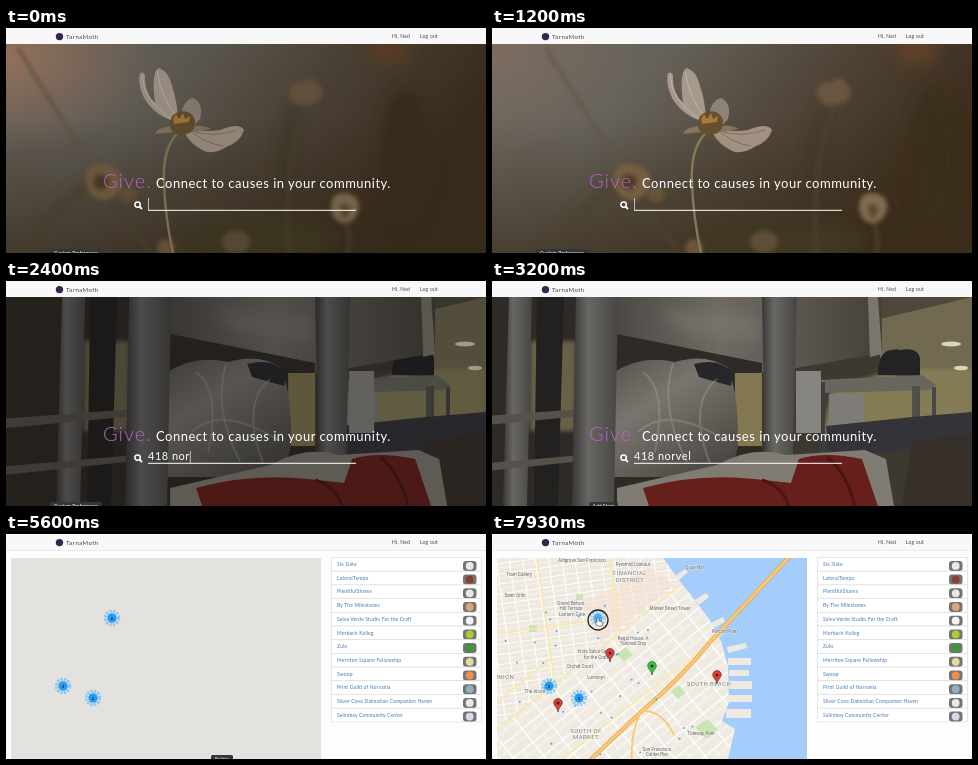
Write an HTML page that moves like this. It is 480 px wide and 225 px high and loops after 8 s.

```html
<!DOCTYPE html>
<html lang="en">
<head>
<meta charset="utf-8">
<title>Community search</title>
<style>
  html, body { margin: 0; width: 100%; height: 100%; overflow: hidden; background: #fdfdfe; }
  svg { display: block; width: 100vw; height: 100vh; }
  text { font-family: Lato, sans-serif; white-space: pre; }
  #labels text { font: 4.6px Roboto, sans-serif; fill: #5c5c5c; stroke: #fff; stroke-width: .8; stroke-opacity: .7; paint-order: stroke; text-anchor: middle; }
  #labels .area { font-size: 6px; letter-spacing: .4px; fill: #777; }
</style>
</head>
<body>
<svg viewBox="0 0 480 225">
  <defs>
    <filter id="soft" x="-50%" y="-50%" width="200%" height="200%"><feGaussianBlur stdDeviation="7"/></filter>
    <filter id="hazy" x="-50%" y="-50%" width="200%" height="200%"><feGaussianBlur stdDeviation="2"/></filter>
    <filter id="slight" x="-20%" y="-20%" width="140%" height="140%"><feGaussianBlur stdDeviation=".6"/></filter>
    <linearGradient id="meadow" x2="1" y2=".35">
      <stop stop-color="#6d675f"/><stop offset=".35" stop-color="#66625b"/>
      <stop offset=".65" stop-color="#51473a"/><stop offset="1" stop-color="#3c2d1c"/>
    </linearGradient>
    <linearGradient id="ground" x2="0" y2="1"><stop offset=".4" stop-color="#3a2d1b" stop-opacity="0"/><stop offset="1" stop-color="#3a2d1b" stop-opacity=".65"/></linearGradient>
    <radialGradient id="sun"><stop stop-color="#b98263" stop-opacity=".7"/><stop offset="1" stop-color="#a98468" stop-opacity="0"/></radialGradient>
    <linearGradient id="steel"><stop stop-color="#383735"/><stop offset=".35" stop-color="#696764"/><stop offset="1" stop-color="#484643"/></linearGradient>
    <linearGradient id="panel"><stop stop-color="#4b4844"/><stop offset=".4" stop-color="#6f6b64"/><stop offset="1" stop-color="#45413a"/></linearGradient>
    <linearGradient id="plastic" x2=".7" y2="1"><stop stop-color="#55524d"/><stop offset=".4" stop-color="#79756e"/><stop offset="1" stop-color="#4b4843"/></linearGradient>
    <pattern id="northGrid" width="13" height="10" patternUnits="userSpaceOnUse" patternTransform="rotate(-8)">
      <path fill="#eee9df" d="M0 0h13v10H0z"/><path d="M0 0H13M0 0V10" stroke="#fff" stroke-width="2.2"/><path d="M0 5H13" stroke="#faf8f4" stroke-width=".8"/>
    </pattern>
    <pattern id="southGrid" width="25" height="17" patternUnits="userSpaceOnUse" patternTransform="rotate(-39)">
      <path fill="#efebe2" d="M0 0h25v17H0z"/><path d="M0 0H25M0 0V17" stroke="#fff" stroke-width="2.6"/><path d="M0 8H25M13 0V8" stroke="#fbfaf6" stroke-width=".9"/>
    </pattern>
    <clipPath id="mapBox"><path d="M5 24H315V225H5z"/></clipPath>
    <clipPath id="heroBox"><path d="M0 16H480V225H0z"/></clipPath>
  </defs>

  <g id="hero" clip-path="url(#heroBox)">
    <path fill="#0c0c0c" d="M0 0H480V225H0z"/>
    <g id="flowers">
      <path fill="url(#meadow)" d="M0 0H480V225H0z"/>
      <path fill="url(#ground)" d="M0 0H480V225H0z"/>
      <ellipse id="glow" cx="5" cy="30" rx="150" ry="95" fill="url(#sun)"/>
      <g id="meadowDrift">
        <g filter="url(#soft)">
          <ellipse cx="382" cy="22" rx="22" ry="14" fill="#5e4128"/>
          <ellipse cx="250" cy="212" rx="80" ry="18" fill="#403824"/>
          <ellipse cx="400" cy="130" rx="26" ry="70" fill="#3a2d1c"/>
          <path d="M288 80Q270 150 280 235" stroke="#3d3424" stroke-width="8" fill="none"/>
          <path d="M20 225Q60 160 95 155" stroke="#4a402d" stroke-width="9" fill="none"/>
        </g>
        <g filter="url(#hazy)">
          <path d="M12 20Q60 100 92 145" stroke="#5e5445" stroke-width="2.5" fill="none"/>
          <path d="M282 66q3-16 15-11 7-9 16 1 10 14-8 20-16 6-23-10z" fill="#6a5540"/>
          <path d="M300 78Q276 130 283 230M338 190Q347 210 341 230M100 165Q130 200 148 230" stroke="#4b4230" stroke-width="3" fill="none"/>
          <path d="M80 152q-2-16 16-16 21 2 20 18-5 19-20 18-15-2-16-20z" fill="#755e40"/>
          <ellipse cx="122" cy="166" rx="9" ry="8" fill="#67523a"/>
          <path d="M325 180q0-16 14-15 15 2 14 16-4 14-15 14-11-1-13-15z" fill="#806d4f"/>
          <path d="M333 180q5-9 12 0-2 11-8 11z" fill="#5d4a31"/>
          <ellipse cx="230" cy="214" rx="14" ry="11" fill="#5f5039"/>
          <ellipse cx="160" cy="220" rx="9" ry="9" fill="#6d553a"/>
          <circle cx="95" cy="154" r="8" fill="#4e3d28"/>
        </g>
        <g filter="url(#slight)">
          <path d="M173 104Q156 119 158 155 159 190 168 230" stroke="#837958" stroke-width="2.4" fill="none"/>
          <path d="M174 93Q176 72 187 70 198 75 194 91L185 101z" fill="#8e8277"/>
          <path d="M168 93Q149 88 138 70 131 54 134 45q4-2 5 3-1 17 10 27-4-28 3-35 10 2 14 18 5 15 6 32z" fill="#a6988a"/>
          <path d="M136 47Q137 72 165 91M151 43q4 28 20 46" stroke="#d0c4b5" stroke-opacity=".65" fill="none"/>
          <path d="M181 99Q195 105 214 102q19-8 24 0-4 12-16 16-14 9-24 5-14-7-20-19z" fill="#a09182"/>
          <path d="M186 103q22 7 45-1M187 105q15 11 30 13" stroke="#7e7062" fill="none"/>
          <path d="M181 99q14-4 24 2l-22 4zM165 98q-14 1-16 8l20-2z" fill="#85755f"/>
          <path d="M164 99q-1-12 8-15 13-3 17 8 1 13-12 15-10 1-13-8z" fill="#65502e"/>
          <path d="M167 91l3-5 3 5 4-6 2 6 5-3-1 6-15 2z" fill="#a87a3c"/>
        </g>
      </g>
    </g>
    <g id="dorm">
      <path fill="#3d3830" d="M0 0H480V225H0z"/>
      <path fill="#716950" d="M375 16H480V130H400z"/>
      <path fill="#857b54" d="M405 88H480V155H330L340 108z" filter="url(#hazy)"/>
      <path fill="#4d483a" d="M388 38 480 16v-5H380z"/>
      <g fill="#d9d5c0" filter="url(#slight)"><ellipse cx="459" cy="63" rx="10" ry="2.5"/><ellipse cx="469" cy="87" rx="7" ry="2.3"/></g>
      <path fill="#232225" d="M386 94q0-19 9-24 10-3 13-1 18-3 20 8v18z"/>
      <path fill="#69665e" d="M325 99 430 94 444 104 437 109 332 112z"/>
      <path fill="#7f7c77" d="M337 113H372V147H337z"/>
      <path fill="url(#steel)" d="M325 101h8v75h-8zM420 105h8v120h-8zM440 106h4v92h-4z"/>
      <path fill="#34333a" d="M334 145 420 136 480 131V160L338 179z"/>
      <path fill="#37302a" d="M420 160 480 152V225H410z"/>
      <g id="bunks">
        <path fill="#2e2a25" d="M-80 16H270V225H-80z"/>
        <path fill="#686146" d="M38 60H84V150H38z" filter="url(#hazy)"/>
        <path fill="#827750" d="M243 92H270V165H243z"/>
        <path fill="#87857f" d="M304 90H329V152H304z" filter="url(#slight)"/>
        <path fill="#23211f" d="M45 16H72L66 225H42z"/>
        <path fill="url(#steel)" d="M17 16H40L35 225H11z"/>
        <path fill="#55514b" d="M-60 139 90 128v7L-60 149zM-60 187 90 174v6L-60 196z"/>
        <path fill="url(#panel)" d="M120 16H390V72L304 87 270 92 120 62z"/>
        <path fill="#2e2b27" d="M120 52 270 82V92L120 65z"/>
        <path fill="#807b72" opacity=".5" d="M166 29 267 35V61L190 51z" filter="url(#soft)"/>
        <path fill="#7c776d" d="M376 16H386L390 73 378 76z"/>
        <path fill="url(#steel)" d="M270 16H305L301 176H273z"/>
        <path fill="url(#plastic)" d="M120 196V92Q150 73 183 81 213 72 235 86 247 110 246 165L238 196z"/>
        <path fill="#27272b" d="M202 83Q230 76 241 94L239 105 207 96z"/>
        <path d="M151 91q25 18 12 80M181 83q-14 43 14 98M225 98q-30 25-7 84M146 151q30-28 89 9" stroke="#aaa69c" stroke-opacity=".35" stroke-width="2" fill="none" filter="url(#slight)"/>
        <path fill="#817c73" d="M225 184Q260 164 294 174L373 169 394 178 402 225H125V207z"/>
        <path fill="#671f1b" d="M151 207Q205 192 263 198L299 202 307 178Q332 170 370 178L386 225H157z"/>
        <path d="M270 199q20 6 27 26M335 176q20 16 28 49" stroke="#4a1614" stroke-width="3" fill="none" filter="url(#slight)"/>
        <path fill="url(#steel)" d="M84 16H126L122 225H80z"/>
      </g>
    </g>
    <path id="shade" fill="#0c0c0c" d="M0 0H480V225H0z"/>
    <text x="97" y="160" font-size="20" font-weight="300" letter-spacing="1" fill="#b862cc">Give.</text>
    <text x="150" y="159.5" font-size="13" letter-spacing=".5" fill="#fff">Connect to causes in your community.</text>
    <g fill="none" stroke="#fff"><circle cx="131.6" cy="176.6" r="2.7" stroke-width="1.5"/><path d="M133.6 178.6 136 181" stroke-width="1.8"/><path d="M142 182.3H350" stroke-width="1"/></g>
    <text id="query" x="142" y="179" font-size="11" letter-spacing=".5" fill="#fff"></text>
    <path id="caret" d="M0 170V182" stroke="#ddd" stroke-width=".8"/>
  </g>

  <g id="results">
    <path fill="#fdfdfe" d="M0 0H480V225H0z"/>
    <path d="M0 16.4H480" stroke="#e2e2e2" stroke-width=".8"/>
    <g id="list"></g>
    <g clip-path="url(#mapBox)">
      <path id="blankMap" fill="#e3e2de" d="M5 24H315V225H5z"/>
      <g id="map">
        <path fill="#a4cdfc" d="M5 24H315V225H5z"/>
        <path fill="url(#southGrid)" d="M5 24H171L184 43 199 61 217 85 229 107 236 132 237 168 230 187 243 195 236 225H5z"/>
        <path fill="url(#northGrid)" d="M5 24H171L190 50 5 195z"/>
        <path fill="#f5dfcf" fill-opacity=".55" d="M90 70 158 34 183 50 108 110z"/>
        <g fill="#cbe4b5"><path d="M125 120l9-7 7 8-9 7zM179 157l8-6 7 8-8 6zM37 91h8v7h-8zM84 60h7v6h-7zM203 193l13-8 10 11-12 9z"/></g>
        <g fill="#eeeae2"><path d="M235 113l19-4 1 5-19 5zM236 124h23v7h-23zM237 136h20v6h-20zM237 147h23v8h-23zM236 161h24v7h-24zM234 175h25v9h-25zM183 42l10-7 3 3-9 8zM203 66l11-7 3 4-10 8zM219 89l12-6 2 5-11 6z"/></g>
        <path d="M5 195 190 50M5 168 60 124M70 225 230 100M5 100 120 84M45 24 62 145M118 24 127 98" stroke="#fbe6a5" stroke-width="1.5" fill="none"/>
        <path d="M300 20 218 108Q190 143 150 177L94 230" stroke="#e8a54a" stroke-width="4.2" fill="none"/>
        <path d="M300 20 218 108Q190 143 150 177L94 230" stroke="#fbc773" stroke-width="2.8" fill="none"/>
        <path d="M150 177Q170 176 182 201M150 177Q138 196 140 230" stroke="#fbc773" stroke-width="1.8" fill="none"/>
        <g id="stops" fill="#5fa3e5"></g>
        <g id="labels"></g>
        <g id="pins"></g>
      </g>
      <g id="clusters"></g>
      <circle id="ring" cx="106" cy="86" r="10" fill="#fff" fill-opacity=".2" stroke="#222" stroke-width="1.3"/>
      <path id="hand" d="M-1 0q1.2-1.3 2 0v3l3 .7q1 .5.6 2L4 8H0L-3 4.8q0-1.5 2-.3z" fill="#fff" stroke="#333" stroke-width=".6"/>
    </g>
  </g>

  <g>
    <path fill="#f8f8f8" d="M0 0H480V16H0z"/>
    <circle cx="53.5" cy="8.6" r="3.7" fill="#33264f"/>
    <text x="60" y="10.7" font-size="6" letter-spacing=".45" fill="#444">TarnaMoth</text>
    <g font-size="5" letter-spacing=".2" fill="#444"><text x="386" y="10">Hi, Ned</text><text x="414" y="10">Log out</text></g>
  </g>
  <g id="tip"><rect y="221" height="9" rx="1.5" fill="#363636"/><text y="226.6" font-size="5" fill="#fff" text-anchor="middle"></text></g>
</svg>
<script>
const LOOP = 8000;
const $ = id => document.getElementById(id);
const fill = (id, items, render) => { $(id).innerHTML = items.map(render).join(''); };
const show = (id, visible) => { $(id).style.display = visible ? '' : 'none'; };
const ramp = (t, start, end) => Math.min(1, Math.max(0, (t - start) / (end - start)));
const ease = p => p * p * (3 - 2 * p);

const causes = [
  ['Six Slate', '#e4eee8'], ['LateralTempo', '#8f3c30'], ['PlentifulShares', '#e8e8e8'],
  ['By The Milestones', '#d9a779'], ['Salva Verde Studio For the Craft', '#f2f2f2'],
  ['Morbach Kolleg', '#a8d02d'], ['Zulo', '#369b35'], ['Merriton Square Fellowship', '#e5d9a0'],
  ['Swoop', '#ee914a'], ['Print Guild of Norvania', '#91b0bd'],
  ['Silver Cove Dalmatian Companion Haven', '#e9e9e9'], ['Salimbay Community Center', '#e3d5e7']
];
const ROW = 13.7;
fill('list', causes, ([name, color], i) => {
  const y = 23.5 + i * ROW;
  return `<rect x="325.5" y="${y}" width="150" height="${ROW}" fill="#fff" stroke="#ddd" stroke-width=".7"/>
    <text x="331" y="${y + 8.5}" font-size="5" letter-spacing=".15" fill="#4479b5">${name}</text>
    <rect x="457" y="${y + 3.4}" width="13.5" height="10" rx="3" fill="#747474"/>
    <circle class="badge" cx="463.7" cy="${y + 8.4}" r="3.9" fill="${color}"/>`;
});
const lateBadge = document.querySelectorAll('.badge')[9];

const labels = [
  [90, 28, 'Aldgrove San Francisco'], [141, 32, 'Pyramid Lookout'], [203, 35, 'Quay Hall'],
  [27, 42, 'Tram Gallery'], [23, 63, 'Saint Orlin'], [79, 71, 'Grand Belvoir'], [79, 76, 'Hill Terrace'],
  [80, 82, 'Lantern Gate'], [178, 76, 'Market Street Tower'], [141, 106, 'Regal House, A'],
  [141, 111, 'Tailored Stay'], [104, 119, 'Vista Salva Center'], [104, 125, 'for the Craft'],
  [88, 134, 'Orchid Court'], [104, 145, 'Lumaryn'], [43, 159, 'The Alcott'], [233, 99, 'Rincon Point'],
  [209, 201, 'Tideway Park'], [165, 217, 'San Francisco'], [165, 222, 'Calder Pier'],
  [138, 41, 'FINANCIAL', 'area'], [138, 48, 'DISTRICT', 'area'], [217, 152, 'SOUTH BEACH', 'area'],
  [94, 199, 'SOUTH OF', 'area'], [94, 205, 'MARKET', 'area'], [12, 145, 'UNION', 'area']
];
fill('labels', labels, ([x, y, text, kind = '']) => `<text x="${x}" y="${y}" class="${kind}">${text}</text>`);

const noise = n => Math.abs(Math.sin(n * 127.1) * 43758.5) % 1;
fill('stops', [...Array(34).keys()], i =>
  `<rect x="${8 + noise(i + 1) * 195}" y="${65 + noise(i + 70) * 155}" width="1.8" height="1.8" rx=".4"/>`);
fill('pins', [[118, 128, '#e83b33'], [66, 178, '#e83b33'], [225, 150, '#e83b33'], [160, 141, '#28cf3c']], ([x, y, color]) =>
  `<g transform="translate(${x} ${y})"><path d="M0 0C-.7-5-4.3-6-4.3-9.2a4.3 4.3 0 0 1 8.6 0C4.3-6 .7-5 0 0Z" fill="${color}" stroke="#333" stroke-width=".6"/><circle cy="-9" r="1.5" fill="#5a1512"/></g>`);
fill('clusters', [[106, 84, 6], [57, 152, 3], [87, 164, 2]], ([x, y, count]) =>
  `<circle cx="${x}" cy="${y}" r="6" fill="none" stroke="#6fbdf6" stroke-opacity=".7" stroke-width="4.5" stroke-dasharray="2.1 1.05"/>
   <circle cx="${x}" cy="${y}" r="4.5" fill="#249af4"/>
   <text x="${x}" y="${y + 1.5}" font-size="4.2" font-weight="700" text-anchor="middle" fill="#123">${count}</text>`);

const QUERY = '418 norvel';
const tips = [[2900, 44, 52, 'Custom Preferences'], [4000, 97, 29, 'Add Store'], [5000, 122, 21, 'Songs'], [6200, 205, 22, 'Folder']];

function drawHero(t) {
  const bedroom = t >= 1700;
  show('flowers', !bedroom);
  show('dorm', bedroom);
  $('meadowDrift').setAttribute('transform', `translate(${t * 0.035} 0)`);
  $('glow').setAttribute('opacity', 1 - 0.7 * ramp(t, 0, 530));
  $('bunks').setAttribute('transform', `translate(${(3200 - t) * 0.049} 0)`);
  $('shade').setAttribute('opacity', bedroom
    ? 0.93 * (1 - ramp(t, 1750, 2700))
    : Math.max(0.1 * (1 - ramp(t, 0, 500)), 0.93 * ramp(t, 1400, 1700)));

  const typed = Math.max(0, Math.floor((t - 1250) / 150));
  $('query').textContent = QUERY.slice(0, typed);
  const width = typed ? $('query').getComputedTextLength() : 0;
  $('caret').setAttribute('transform', `translate(${142.5 + width} 0)`);
  const blinkOn = t % 1060 < 530;
  show('caret', t < 1250 ? blinkOn : t < 2900 || !blinkOn);
}

function drawResults(t) {
  show('list', t >= 4300);
  lateBadge.style.display = t >= 5000 ? '' : 'none';
  show('blankMap', t >= 4950);
  show('clusters', t >= 5400);
  $('map').setAttribute('opacity', ramp(t, 6250, 6550));
  const p = ease(ramp(t, 6700, 7700));
  show('hand', t >= 6700);
  $('hand').setAttribute('transform', `translate(${215 - 109 * p} ${226 - 142 * p})`);
  show('ring', t >= 7860);
}

function draw(t) {
  const searching = t < 4000;
  show('hero', searching);
  show('results', !searching);
  if (searching) drawHero(t); else drawResults(t);

  const tip = tips.find(([end]) => t < end);
  show('tip', tip);
  if (tip) {
    const [, x, width, name] = tip, [box, text] = $('tip').children;
    box.setAttribute('x', x);
    box.setAttribute('width', width);
    text.setAttribute('x', x + width / 2);
    text.textContent = name;
  }
}

const start = performance.now();
function tick() {
  draw((performance.now() - start) % LOOP);
  requestAnimationFrame(tick);
}
tick();
</script>
</body>
</html>
```
